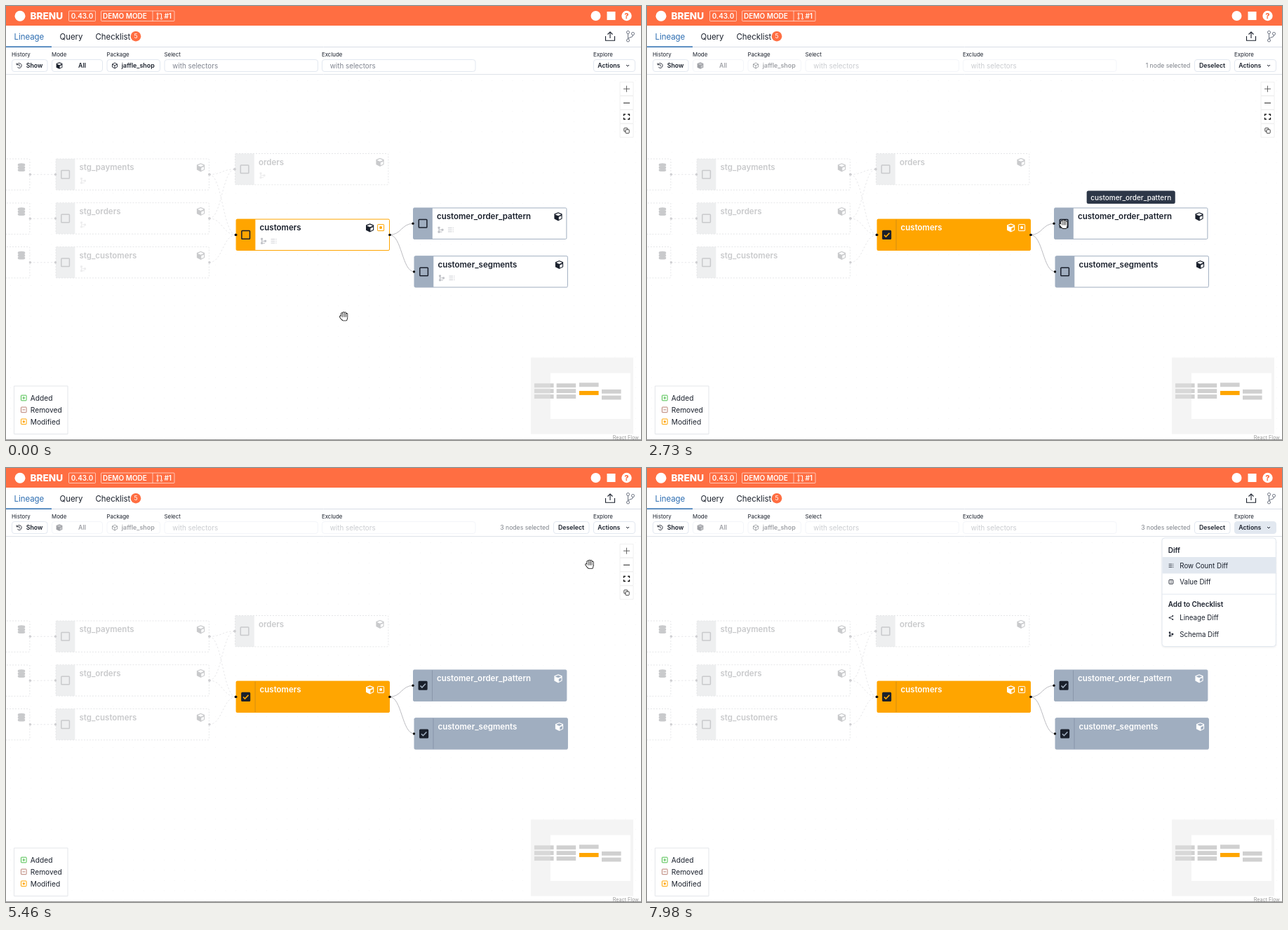
An HTML page with a canvas that plays this animation: 905x619 px, repeating every 8000 ms.

```html
<!DOCTYPE html>
<html lang="en">
<head>
<meta charset="utf-8">
<title>Lineage</title>
<style>
html, body { margin: 0; width: 100%; height: 100%; overflow: hidden; background: #fff; }
canvas { display: block; width: 905px; height: 619px; }
</style>
</head>
<body>
<canvas id="stage"></canvas>
<script>
const W = 905, H = 619, LOOP = 8000;
const ORANGE = '#ff6e42', AMBER = '#ffa500', SLATE = '#a0aec0', INK = '#1a202c';
const LINE = '#e2e8f0', PALE = '#c9cacc', WHITE = '#fff';
const canvas = document.getElementById('stage');
const dpr = window.devicePixelRatio || 1;
canvas.width = W * dpr;
canvas.height = H * dpr;
const c = canvas.getContext('2d');

// ---------- drawing helpers ----------
function text(s, x, cy, size, color, weight = 400, align = 'left') {
  c.font = `${weight} ${size}px Inter, "Liberation Sans", sans-serif`;
  c.textAlign = align;
  c.fillStyle = color;
  c.fillText(s, x, cy + size * 0.364);
}

function box(x, y, w, h, fill, stroke, r = 0, lw = 1) {
  c.beginPath();
  c.roundRect(x, y, w, h, r);
  if (fill) { c.fillStyle = fill; c.fill(); }
  if (stroke) { c.strokeStyle = stroke; c.lineWidth = lw; c.stroke(); }
}

function path(pts, color, lw = 1, fill = false) {
  c.beginPath();
  for (let i = 0; i < pts.length; i += 2) c.lineTo(pts[i], pts[i + 1]);
  if (fill) { c.fillStyle = color; c.fill(); }
  else { c.strokeStyle = color; c.lineWidth = lw; c.stroke(); }
}

function dot(x, y, r, fill, stroke, lw = 1) {
  c.beginPath();
  c.arc(x, y, r, 0, 7);
  if (fill) { c.fillStyle = fill; c.fill(); }
  if (stroke) { c.strokeStyle = stroke; c.lineWidth = lw; c.stroke(); }
}

function at(x, y, draw, scale = 1, alpha = 1) {
  c.save();
  c.translate(x, y);
  c.scale(scale, scale);
  c.globalAlpha *= alpha;
  draw();
  c.restore();
}

// ---------- icons ----------
function cube(x, y, color, hole, scale = 1) {
  at(x, y, () => {
    path([0, -6, 5.6, -3.7, 5.6, 3.4, 0, 6.2, -5.6, 3.4, -5.6, -3.7], color, 1, true);
    path([0, -4.6, 4.4, -2.8, 0, -1, -4.4, -2.8], hole, 1, true);
    path([0.8, 0.6, 4.5, -1, 4.5, 2.8, 0.8, 4.6], hole, 1, true);
  }, scale);
}

function database(x, y, color) {
  for (let i = -1; i < 2; i++) {
    c.beginPath();
    c.ellipse(x, y + i * 3.7 - 0.7, 5.2, 1.6, 0, 0, 7);
    c.rect(x - 5.2, y + i * 3.7 - 0.5, 10.4, 1.3);
    c.ellipse(x, y + i * 3.7 + 0.6, 5.2, 1.5, 0, 0, 7);
    c.fillStyle = color;
    c.fill();
  }
}

function tree(x, y, color, scale = 1) {
  at(x, y, () => {
    path([-2.5, -3, -2.5, 3, 2, 3], color, 1);
    path([-2.5, 0, 2, 0], color, 1);
    for (const [px, py] of [[-2.5, -3], [-2.5, 3], [2.5, 0]]) {
      box(px - 1.5, py - 1.5, 3, 3, color, null, 0.8);
    }
  }, scale);
}

function rows(x, y, color, scale = 1) {
  at(x, y, () => {
    for (const dy of [-3, 0, 3]) {
      path([-4.5, dy, 1.8, dy], color, 1);
      path([3, dy, 4.5, dy], color, 1);
    }
  }, scale);
}

function badge(x, y, color, kind, size = 8) {
  box(x - size / 2, y - size / 2, size, size, null, color, 0.6, 1);
  if (kind === 'mod') dot(x, y, size * 0.22, color);
  else path([x - 2, y, x + 2, y], color, 1);
  if (kind === 'add') path([x, y - 2, x, y + 2], color, 1);
}

function chevron(x, y, color) {
  path([x - 2, y - 1, x, y + 1, x + 2, y - 1], color, 1);
}

function hand(x, y, pointing) {
  const fingers = pointing
    ? [[-1.7, -5.4], [0.7, -1.2], [2.8, -0.8], [4.7, 0]]
    : [[-3.1, -3.6], [-0.8, -4.9], [1.6, -4.6], [3.9, -3]];
  at(x, y, () => {
    c.lineCap = c.lineJoin = 'round';
    for (const [color, grow] of [['#111', 1.7], [WHITE, 0]]) {
      for (const [fx, fy] of fingers) path([fx, 1.5, fx, fy], color, 1.5 + grow);
      path([-2.6, 4, -5.2, 0.6], color, 1.6 + grow);
      path([-2.4, 2.2, 3.9, 2.2, 3, 5.3, -1.3, 5.3, -2.4, 2.2], color, 1.5 + grow);
      path([-2.4, 2.2, 3.9, 2.2, 3, 5.3, -1.3, 5.3], color, 1, true);
    }
  });
}

// ---------- graph ----------
const NW = 218.4, NH = 44.4;
const nodes = [
  { x: -184.5, y: 218, icon: 'db' },
  { x: -184.5, y: 281, icon: 'db' },
  { x: -184.5, y: 343.5, icon: 'db' },
  { name: 'stg_payments', x: 71, y: 218 },
  { name: 'stg_orders', x: 71, y: 280.7 },
  { name: 'stg_customers', x: 71, y: 343.5 },
  { name: 'orders', x: 326.5, y: 210.5 },
  { name: 'customers', x: 328.1, y: 304.1, color: AMBER, pick: 1190, hover: [870, 2340] },
  { name: 'customer_order_pattern', x: 580.5, y: 288, color: SLATE, pick: 2870, hover: [2490, 3410] },
  { name: 'customer_segments', x: 582, y: 356.7, color: SLATE, pick: 3920, hover: [3540, 4650] },
];
const links = [[0, 3], [1, 4], [2, 5], [3, 6], [3, 7], [4, 6], [4, 7], [5, 7], [7, 8], [7, 9]];

function drawLink([from, to]) {
  const a = nodes[from], b = nodes[to], live = a.color;
  const x1 = a.x + NW, y1 = a.y + 22.3, y2 = b.y + 22.3, mid = (x1 + b.x) / 2;
  c.setLineDash(live ? [] : [2.5, 2.5]);
  c.beginPath();
  c.moveTo(x1, y1);
  c.bezierCurveTo(mid, y1, mid, y2, b.x, y2);
  c.strokeStyle = live ? '#b4b4b9' : '#e6e6e8';
  c.lineWidth = 0.9;
  c.stroke();
  c.setLineDash([]);
}

function checkbox(x, y, color, on, tick) {
  box(x - 5.8, y - 5.8, 11.6, 11.6, on ? color : null, color, 0.8, 1.5);
  if (on) path([x - 3.6, y + 0.2, x - 1.2, y + 2.7, x + 3.8, y - 2.5], tick, 1.6);
}

function drawNode(n, t, selecting) {
  const { x, y, color } = n, on = color && t >= n.pick;
  const ink = on ? WHITE : color ? INK : PALE;
  const fill = on ? color : WHITE;
  box(x, y, NW, NH, fill, null, 1.5);
  box(x, y, 27.3, NH, color || '#eeeff0', null, [1.5, 0, 0, 1.5]);
  if (on) path([x + 27, y, x + 27, y + NH], 'rgba(60,70,90,.22)', 1);
  if (!color) c.setLineDash([2, 2]);
  box(x, y, NW, NH, null, color || '#e5e6e8', 1.5, 1);
  c.setLineDash([]);
  checkbox(x + 13.6, y + 22.3, color ? INK : PALE, on, color);
  if (n.name) text(n.name, x + 33.5, y + 12.2, 11.5, ink, 600);
  if (n.icon) database(x + 206.5, y + 12.3, PALE);
  else cube(x + (color === AMBER ? 190.5 : 206.5), y + 12.2, ink, fill);
  if (color === AMBER) badge(x + 206, y + 12, on ? WHITE : AMBER, 'mod', 9);
  if (!selecting && n.name) {
    tree(x + 39, y + 31.2, color ? '#bfc1c6' : '#ededee');
    if (color) rows(x + 53.5, y + 31.2, '#c9cbd0', 0.9);
  }
}

function drawPort(x, y, live) {
  dot(x, y, 1.7, live ? '#111' : '#cfcfd2');
}

function drawTip(n, t) {
  const [start, end] = n.hover;
  const k = Math.min(1, (t - start) / 150, 1 - (t - end) / 125);
  if (k <= 0) return;
  at(n.x + NW / 2, n.y - 15.3, () => {
    c.font = '500 10px Inter, "Liberation Sans", sans-serif';
    const w = c.measureText(n.name).width + 11.2;
    box(-w / 2, -9.2, w, 18.4, '#2d3748', null, 2.5);
    text(n.name, 0, 0.2, 10, WHITE, 500, 'center');
  }, 0.92 + 0.08 * k, k);
}

function drawGraph(t, selecting) {
  c.fillStyle = '#f4f4f5';
  for (let y = 106; y < H; y += 14.6) {
    for (let x = 6; x < W; x += 14.6) c.fillRect(x, y, 1, 1);
  }
  links.forEach(drawLink);
  nodes.forEach(n => drawNode(n, t, selecting));
  for (const [a, b] of links) {
    const from = nodes[a], to = nodes[b];
    drawPort(from.x + NW + 0.5, from.y + 22.3, from.color);
    drawPort(to.x - 0.5, to.y + 22.3, to.color);
  }
}

// ---------- fixed panels ----------
function drawHeader() {
  box(0, 0, W, 28, ORANGE);
  dot(20, 14.3, 7.5, WHITE);
  text('BRENU', 34.5, 14.4, 13.6, WHITE, 800);
  const rim = 'rgba(255,255,255,.6)';
  box(89.5, 7, 38, 14.5, null, rim, 1);
  text('0.43.0', 108.5, 14.5, 9.9, WHITE, 600, 'center');
  box(135.5, 7, 104.5, 14.5, null, rim, 1);
  path([209, 7, 209, 21.5], rim, 1);
  text('DEMO MODE', 138, 14.5, 10, WHITE, 600);
  text('#1', 225.5, 14.5, 9.9, WHITE, 600);
  path([216, 12, 216, 18], WHITE, 1);
  path([218.5, 11, 221.5, 11, 221.5, 17], WHITE, 1);
  for (const [x, y] of [[216, 11], [216, 18], [221.5, 18]]) dot(x, y, 1.1, ORANGE, WHITE, 0.8);
  dot(840.5, 14, 7, WHITE);
  box(856.5, 8, 12, 12, WHITE);
  dot(884.5, 14, 7.2, WHITE);
  text('?', 884.5, 14.2, 11, ORANGE, 800, 'center');

  path([0, 58.5, W, 58.5], '#d9dee6', 1);
  box(0, 57.4, 65, 1.5, '#2b6cb0');
  text('Lineage', 11.5, 43.4, 11.4, '#2b6cb0');
  text('Query', 76.5, 43.4, 11.4, INK);
  text('Checklist', 127.5, 43.4, 11.4, INK);
  dot(185, 43.2, 7.3, ORANGE);
  text('5', 185, 43.3, 8.6, WHITE, 400, 'center');

  path([854.5, 43, 854.5, 49.2, 867.5, 49.2, 867.5, 43], INK, 1.1);
  path([861, 46, 861, 37], INK, 1.1);
  path([857.5, 40.5, 861, 37, 864.5, 40.5], INK, 1.1);
  const gray = '#6b7280';
  path([886.5, 38, 886.5, 49], gray, 1);
  path([893.5, 41, 893, 43.5, 887, 46], gray, 1);
  for (const [x, y] of [[886.5, 37.5], [886.5, 49], [893.5, 39.5]]) dot(x, y, 2, WHITE, gray, 1);
}

function drawToolbar(t, selecting, count) {
  path([0, 97.5, W, 97.5], '#dfe3e9', 1);
  const labels = { History: 8, Mode: 65, Package: 143.5, Select: 225.5, Exclude: 450, Explore: 837 };
  for (const name in labels) text(name, labels[name], 69, 7.9, INK);

  box(8.5, 76.5, 50.5, 17, WHITE, LINE, 3.5);
  c.beginPath();
  c.arc(18.8, 85, 3.3, -2.8, 2.4);
  c.strokeStyle = INK;
  c.lineWidth = 0.9;
  c.stroke();
  path([15, 81.5, 15.4, 84, 17.8, 83.6], INK, 0.9);
  path([18.8, 83, 18.8, 85.3, 20.3, 86], INK, 0.8);
  text('Show', 28.8, 85, 8.75, INK, 600);

  at(0, 0, () => {
    box(65.5, 76.5, 72, 17, WHITE, LINE, 3.5);
    cube(76, 85, INK, WHITE, 0.78);
    text('All', 108.5, 85, 8.75, INK, 600, 'center');
    box(144, 76.5, 75.5, 17, WHITE, LINE, 3.5);
    path([155, 81, 158.5, 83, 158.5, 87, 155, 89, 151.5, 87, 151.5, 83, 155, 81], INK, 0.9);
    path([151.5, 83, 155, 85, 158.5, 83], INK, 0.9);
    path([155, 85, 155, 89], INK, 0.9);
    text('jaffle_shop', 164.8, 85, 8.9, INK, 600);
    for (const x of [226, 450.5]) {
      box(x, 76.5, 218.5, 17, WHITE, LINE, 3.5);
      text('with selectors', x + 11.3, 85, 9.85, '#808590');
    }
  }, 1, selecting ? 0.42 : 1);

  if (selecting) {
    text(`${count} node${count > 1 ? 's' : ''} selected`, 774.3, 84.6, 8.65, '#7c8088', 400, 'right');
    box(780.5, 76.5, 50.5, 17, WHITE, LINE, 3.5);
    text('Deselect', 805.5, 85, 8.75, INK, 600, 'center');
  }
  const face = t > 6480 ? '#e2e8f0' : t > 6160 ? '#edf2f7' : WHITE;
  box(837.5, 76.5, 59, 17, face, LINE, 3.5);
  text('Actions', 843.2, 84.7, 8.75, INK, 600);
  chevron(886, 85, INK);
}

function drawControls() {
  for (let i = 0; i < 4; i++) box(875, 108.5 + i * 19.8, 19, 19.3, WHITE, '#ececec', 0, 0.8);
  path([880, 118.2, 889, 118.2], '#555', 0.9);
  path([884.5, 113.7, 884.5, 122.7], '#555', 0.9);
  path([880, 138.3, 889, 138.3], '#222', 1);
  for (const sx of [-1, 1]) for (const sy of [-1, 1]) {
    path([884.5 + sx * 1.6, 158 + sy * 3.5, 884.5 + sx * 4, 158 + sy * 3.5, 884.5 + sx * 4, 158 + sy * 1.3], '#111', 1.3);
  }
  box(880.8, 174, 5, 5, null, '#333', 0.8, 0.9);
  box(883, 176.2, 5.2, 5.2, WHITE, '#333', 0.8, 0.9);
}

function drawLegend() {
  box(11.5, 542, 76.5, 68.5, WHITE, '#e4e6ea', 0, 1);
  const items = [['Added', '#4fc04f', 'add'], ['Removed', '#b98074', 'del'], ['Modified', AMBER, 'mod']];
  items.forEach(([name, color, kind], i) => {
    badge(25.3, 559 + i * 16.9, color, kind, 7.6);
    text(name, 34.8, 559.2 + i * 16.9, 10.2, INK);
  });
}

function drawMinimap() {
  box(748, 501.5, 146, 109, '#f4f4f4');
  box(776, 523.5, 114, 65.5, WHITE);
  const mini = (x, y, color = '#d0d0d0') => box(x, y, 27.6, 5.9, color);
  for (let i = 0; i < 3; i++) {
    mini(753, 538.3 + i * 7.9);
    mini(784.6, 538.3 + i * 7.9);
  }
  box(753, 538, 23, 23, 'rgba(240,240,240,.25)');
  mini(817, 537.3);
  mini(817, 549, AMBER);
  mini(849, 546.9);
  mini(849, 555.6);
  text('React Flow', 902, 615, 7.2, '#999', 400, 'right');
  box(0, 618.3, W, 0.7, '#777');
}

function drawMenu(t) {
  const k = Math.min(1, (t - 6480) / 170);
  if (k <= 0) return;
  c.save();
  c.translate(896, 99.5);
  c.scale(0.85 + 0.15 * k, 0.85 + 0.15 * k);
  c.translate(-896, -99.5);
  c.globalAlpha = k;
  c.shadowColor = 'rgba(0,0,0,.1)';
  c.shadowBlur = 3;
  c.shadowOffsetY = 1;
  box(734, 99.8, 162.3, 154.7, WHITE, null, 4);
  c.shadowColor = 'transparent';
  box(734.5, 127, 161.5, 23.5, t >= 7910 ? '#e2e8f0' : '#edf2f7');
  box(734, 99.8, 162.3, 154.7, null, LINE, 4);
  path([734, 180, 896, 180], LINE, 1);
  text('Diff', 742.8, 117, 9.9, INK, 600);
  text('Add to Checklist', 742.8, 194.3, 9.9, INK, 600);
  const items = { 'Row Count Diff': 139, 'Value Diff': 162.3, 'Lineage Diff': 213.5, 'Schema Diff': 237 };
  for (const name in items) text(name, 759.3, items[name], 9.7, INK);
  rows(747, 139.3, INK, 0.75);
  box(744, 159.5, 5.8, 5.8, null, INK, 0.6, 0.9);
  path([746, 161.4, 748, 161.4], INK, 0.7);
  path([746, 163.4, 748, 163.4], INK, 0.7);
  path([749.5, 211, 744.5, 213.5, 749.5, 216], INK, 0.8);
  for (const [x, y] of [[744.5, 213.5], [749.3, 211], [749.3, 216]]) dot(x, y, 0.9, INK);
  tree(747, 237, INK, 0.8);
  c.restore();
}

// ---------- cursor motion ----------
const keys = [
  [0, 481.7, 442.4], [245, 481.7, 442.4], [600, 405, 376], [1000, 342, 327], [1420, 342, 327],
  [1890, 444.7, 322.4], [2300, 540, 316], [2620, 594, 311], [3260, 594, 311], [3500, 598.5, 352.4],
  [3570, 598.5, 360], [3760, 596, 382], [4430, 596, 382], [4620, 619, 360.4], [5250, 799, 165],
  [5460, 832, 137.3], [6090, 890, 97], [6180, 893, 82], [6300, 888.5, 100], [6940, 888.5, 100],
  [7210, 866.5, 152], [7490, 866.5, 137], [LOOP, 866.5, 137],
];

const slope = (i, axis) => (keys[i + 1][axis] - keys[i][axis]) / (keys[i + 1][0] - keys[i][0]);

function tangent(i, axis) {
  if (i === 0 || i === keys.length - 1) return 0;
  const a = slope(i - 1, axis), b = slope(i, axis);
  return a * b > 0 ? 2 * a * b / (a + b) : 0;
}

// Monotone cubic through the key positions
function glide(t, axis) {
  let i = 0;
  while (i < keys.length - 2 && t >= keys[i + 1][0]) i++;
  const span = keys[i + 1][0] - keys[i][0], u = (t - keys[i][0]) / span, v = 1 - u;
  return keys[i][axis] * (1 + 2 * u) * v * v + keys[i + 1][axis] * u * u * (3 - 2 * u)
    + span * u * v * (tangent(i, axis) * v - tangent(i + 1, axis) * u);
}

function draw(t) {
  const count = nodes.filter(n => t >= n.pick).length, selecting = count > 0;
  c.setTransform(dpr, 0, 0, dpr, 0, 0);
  c.fillStyle = WHITE;
  c.fillRect(0, 0, W, H);
  drawGraph(t, selecting);
  drawHeader();
  drawToolbar(t, selecting, count);
  drawControls();
  drawLegend();
  drawMinimap();
  for (const n of nodes) if (n.hover) drawTip(n, t);
  drawMenu(t);
  if (t < 7975) hand(glide(t, 1), glide(t, 2), t >= 6150);
}

const begin = performance.now();
function tick() {
  draw((performance.now() - begin) % LOOP);
  requestAnimationFrame(tick);
}
tick();
</script>
</body>
</html>
```
